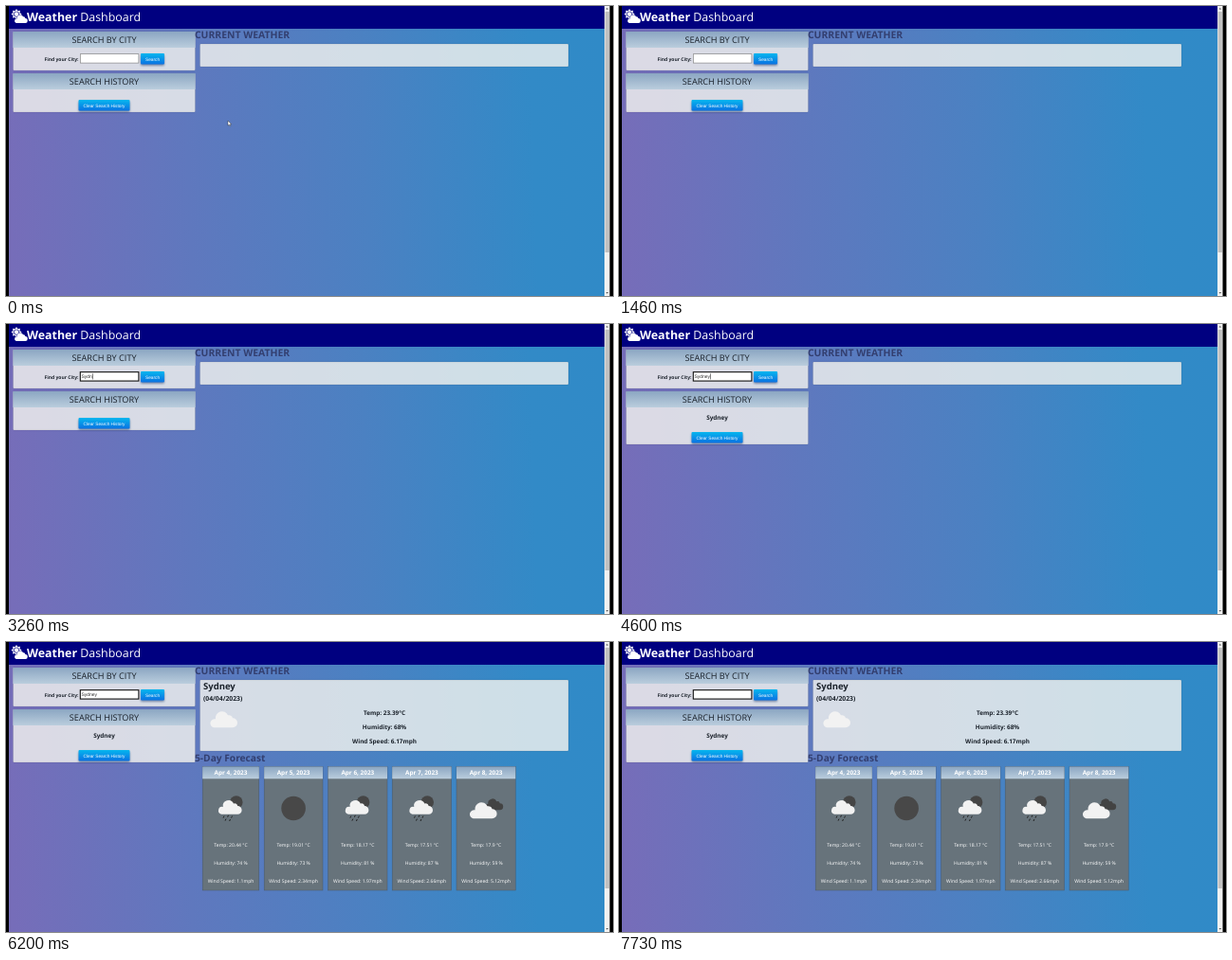
An HTML page that plays this animation: 640 by 306 pixels, repeating every 8000 ms.

```html
<!DOCTYPE html>
<html lang="en">
<head>
<meta charset="utf-8">
<title>Weather Dashboard</title>
<style>
  html, body { margin: 0; width: 100%; height: 100%; overflow: hidden; background: #000; }
  svg { display: block; }
  text { font-family: "Open Sans", "Noto Sans", sans-serif; text-rendering: geometricPrecision; white-space: pre; }
  .arial { font-family: "Liberation Sans", Arial, sans-serif; }
</style>
</head>
<body>
<svg id="stage" width="640" height="306" viewBox="0 0 640 306">
  <defs>
    <linearGradient id="sky" gradientUnits="userSpaceOnUse" x1="3" y1="165" x2="631" y2="141">
      <stop offset="0" stop-color="#766db9"/>
      <stop offset=".3" stop-color="#5f78be"/>
      <stop offset=".6" stop-color="#4b81c2"/>
      <stop offset=".88" stop-color="#328ac7"/>
      <stop offset="1" stop-color="#308ac7"/>
    </linearGradient>
    <linearGradient id="band" x2="0" y2="1">
      <stop offset="0" stop-color="#8ba6c2"/>
      <stop offset="1" stop-color="#bacddd"/>
    </linearGradient>
    <linearGradient id="blue" x2="0" y2="1">
      <stop offset="0" stop-color="#06b6ee"/>
      <stop offset="1" stop-color="#0a72e2"/>
    </linearGradient>
    <filter id="soft" x="-20%" y="-50%" width="140%" height="200%">
      <feGaussianBlur stdDeviation="1.1"/>
    </filter>
    <path id="cloud" d="M5 18H25a5 5 0 0 0 0-10a4 4 0 0 0-5-3a6.85 6.85 0 0 0-13 4a4.6 4.6 0 0 0-2 9z"/>
  </defs>
  <rect width="640" height="306"/>
  <rect x="3" width="628" height="306" fill="url(#sky)"/>
  <rect x="3" width="628" height="24" fill="#000080"/>
  <g id="page"></g>
  <rect x="631" width="5.5" height="306" fill="#f1f1f1"/>
  <rect x="631.6" y="6" width="4.3" height="254" fill="#c1c1c1"/>
  <path d="M632.4 3.6l1.4-1.6l1.4 1.6zM632.4 302l1.4 1.6l1.4-1.6z" fill="#555"/>
  <path id="pointer" d="M0 0V5.2L1.2 4.1L2 5.9L2.9 5.5L2.1 3.8H3.7z" fill="#fff" stroke="#222" stroke-width=".4"/>
</svg>
<script>
const LOOP = 8000;
const INK = '#1b222b', TITLE = '#333f70';
const el = id => document.getElementById(id);
const parts = [];

const text = (str, x, y, size, { weight = 400, fill = INK, anchor = 'middle', cls = '', id = '' } = {}) =>
  `<text x="${x}" y="${y}" font-size="${size}" font-weight="${weight}" fill="${fill}" text-anchor="${anchor}" class="${cls}" id="${id}">${str}</text>`;
const rect = (x, y, w, h, fill, extra = '') =>
  `<rect x="${x}" y="${y}" width="${w}" height="${h}" fill="${fill}" ${extra}/>`;
const panel = (x, y, w, h, id = '') =>
  rect(x, y, w, h, '#f5f5f0', `rx="1" fill-opacity=".8" stroke="#000" stroke-opacity=".18" stroke-width=".5" id="${id}"`);
const band = (x, y, w, h) => rect(x, y, w, h, 'url(#band)');
const cloud = (x, y, scale, fill) =>
  `<use href="#cloud" transform="translate(${x} ${y}) scale(${scale})" fill="${fill}"/>`;
const disc = (x, y, r, fill) => `<circle cx="${x}" cy="${y}" r="${r}" fill="${fill}"/>`;
const button = (x, y, w, label) =>
  rect(x, y + 1.5, w, 11.5, '#26406e', 'rx="1.5" opacity=".55" filter="url(#soft)"') +
  rect(x, y, w, 11.5, 'url(#blue)', 'rx="1"') +
  text(label, x + w / 2, y + 7.7, 4.75, { fill: '#fff', cls: 'arial' });
const group = (id, body) => `<g id="${id}">${body}</g>`;

// header
const rays = Array.from({ length: 8 }, (_, i) =>
  `<path d="M-1.5 -3.4L0 -5.6L1.5 -3.4z" transform="translate(11 8.6) rotate(${i * 45})" fill="#fff"/>`).join('');
parts.push(
  rays, disc(11, 8.6, 3.7, '#fff'), disc(11, 8.6, 2.9, '#000080'), disc(11, 8.6, 2.3, '#fff'),
  `<use href="#cloud" transform="translate(8.4 8.8) scale(.48 .51)" fill="#fff" stroke="#000080" stroke-width="1.8" paint-order="stroke"/>`,
  text('<tspan font-weight="700">Weather</tspan> Dashboard', 22, 15.6, 12.4, { fill: '#fff', anchor: 'start' })
);

// search column
parts.push(
  panel(7.5, 27, 192, 41), band(7.5, 27, 192, 17),
  text('SEARCH BY CITY', 103.5, 39, 9.15, { weight: 500 }),
  text('Find your City:', 40.5, 57.6, 5, { weight: 700, anchor: 'start' }),
  rect(78.3, 50.7, 61.6, 9.4, '#fff', 'id="box"'),
  text('', 79.4, 57.3, 5, { anchor: 'start', cls: 'arial', fill: '#333', id: 'typed' }),
  rect(80, 52.4, .5, 6, '#000', 'id="caret"'),
  button(142, 50, 25, 'Search'),
  panel(7.5, 71, 192, 41, 'history'), band(7.5, 71, 192, 17),
  text('SEARCH HISTORY', 103.5, 83.4, 9.15, { weight: 500 }),
  group('entry', text('Sydney', 103.5, 101.3, 6.4, { weight: 700 })),
  group('clear', button(76.5, 99, 54, 'Clear Search History'))
);

// current weather
const bold = { weight: 700 };
const left = { weight: 700, anchor: 'start' };
const heading = { ...left, fill: TITLE };
parts.push(
  text('CURRENT WEATHER', 199, 34, 10.4, heading),
  panel(204.5, 40, 388.5, 24, 'current'),
  group('now',
    text('Sydney', 208, 50, 9.5, left) +
    text('(04/04/2023)', 208, 61.8, 6.8, left) +
    cloud(214, 72.3, 1, '#f2f2f2') +
    ['Temp: 23.39°C', 'Humidity: 68%', 'Wind Speed: 6.17mph']
      .map((s, i) => text(s, 399, 77 + i * 15.2, 6.4, bold)).join(''))
);

// forecast
const rain = c => {
  const drops = [[-7, 3.6], [-2.5, 2.8], [-5, 6.6], [1.5, 3.6], [-.5, 7]]
    .map(([x, y]) => `<path d="M${c + x} ${180 + y}l-.9 2" stroke="#222" stroke-width="1"/>`).join('');
  return disc(c + 5.8, 169, 6.8, '#454545') + cloud(c - 14.2, 166.2, .86, '#f2f2f2') + drops;
};
const icons = {
  rain,
  clear: c => disc(c, 175.5, 12.8, '#484848'),
  clouds: c => cloud(c - 2.6, 164.8, .69, '#434343') + cloud(c - 18.5, 168.3, 1, '#f2f2f2')
};
const days = [
  [207.2, 59.6, 'rain', 20.44, 74, 1.1],
  [272.2, 61.8, 'clear', 19.01, 73, 2.34],
  [339.6, 62.4, 'rain', 18.17, 81, 1.97],
  [407.2, 62.4, 'rain', 17.51, 87, 2.66],
  [475, 62.2, 'clouds', 17.9, 59, 5.12]
];
const white = { fill: '#fff' };
const dayCard = ([x, w, icon, temp, wet, wind], i) => {
  const c = x + w / 2;
  return rect(x, 131.5, w, 130.5, '#67737b', 'stroke="#48596b" stroke-width=".5"') +
    band(x, 131.5, w, 12.8) +
    text(`Apr ${i + 4}, 2023`, c, 140.2, 6.4, { ...white, weight: 700 }) +
    icons[icon](c) +
    text(`Temp: ${temp} °C`, c, 215.6, 5.05, white) +
    text(`Humidity: ${wet} %`, c, 234.8, 5.05, white) +
    text(`Wind Speed: ${wind}mph`, c, 254, 5.05, white);
};
parts.push(group('forecast',
  text('5-Day Forecast', 199, 125.6, 10.2, heading) + days.map(dayCard).join('')));

el('page').innerHTML = parts.join('');

// timeline
const CITY = 'Sydney';
const FOCUS = 1730, SUBMIT = 4600, NOW = 4730, WEEK = 4800;
const keysDown = [2860, 3060, 3200, 3260, 3400, 3530];
const keysBack = [7000, 7200, 7330, 7460, 7600, 7730];
const caretFlips = [1730, 2260, 2800, 4060, 4600, 5130, 5660, 6200, 6730, 7730];
const count = (list, t) => list.filter(at => t >= at).length;
const show = (id, on) => el(id).setAttribute('visibility', on ? 'visible' : 'hidden');
const set = (id, attrs) => Object.entries(attrs).forEach(([k, v]) => el(id).setAttribute(k, v));

function draw(t) {
  const p = Math.min(1, Math.max(0, (t - 60) / 1340));
  const e = p * p * (3 - 2 * p);
  set('pointer', { transform: `translate(${234 - 119 * e} ${121 - 65 * e})` });
  show('pointer', t < 1400);

  const focused = t >= FOCUS;
  set('box', { stroke: focused ? '#101010' : '#767676', 'stroke-width': focused ? 1.1 : .6 });
  const typed = el('typed');
  const value = CITY.slice(0, count(keysDown, t) - count(keysBack, t));
  if (typed.textContent !== value) typed.textContent = value;
  set('caret', { x: 79.6 + (value ? typed.getComputedTextLength() : 0) });
  show('caret', count(caretFlips, t) % 2 === 1);

  const saved = t >= SUBMIT;
  set('history', { height: saved ? 56 : 41 });
  set('clear', { transform: `translate(0 ${saved ? 15 : 0})` });
  show('entry', saved);

  set('current', { height: t >= NOW ? 75 : 24 });
  show('now', t >= NOW);
  show('forecast', t >= WEEK);
}

const start = performance.now();
function tick() {
  draw((performance.now() - start) % LOOP);
  requestAnimationFrame(tick);
}
tick();
</script>
</body>
</html>
```
